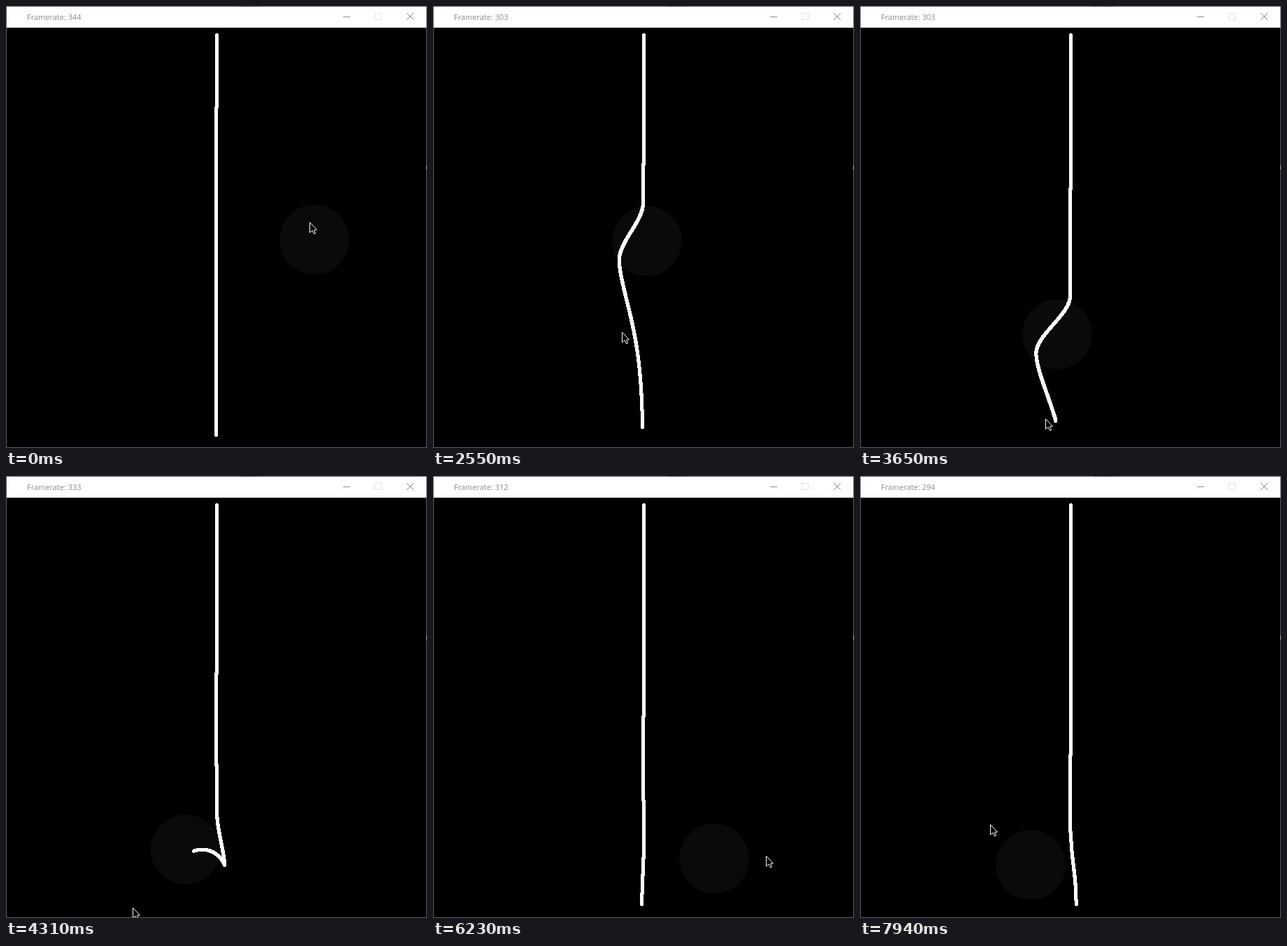
These frames come from a looping animation (602 px wide and 632 px high, 7.99 s). An HTML page with a canvas:

```html
<!DOCTYPE html>
<html lang="en">
<head>
<meta charset="utf-8">
<title>Rope</title>
<style>
html, body { margin: 0; width: 100%; height: 100%; overflow: hidden; background: #000; }
canvas { display: block; width: 100vw; height: 100vh; }
</style>
</head>
<body>
<canvas id="stage" width="602" height="632"></canvas>
<script>
const ctx = document.getElementById('stage').getContext('2d');
const LOOP = 7990;
const FOLLOW = 0.00094;            // share of its distance the ball closes per ms
const RADIUS = 50;
const TOP_X = 301, TOP_Y = 41, ROPE = 571.5, TAIL = 54;
const SLIPS = [3750, 5750, 7650];  // moments when the rope slips past the ball
const WHIP = 4310;                 // moment when the rope's tail is curled up most

const keys = [
  { t: 0, ball: [441, 334], mouse: [434, 309], ms: 2.9 },
  { t: 1450, ball: [373, 265], mouse: [263, 225], ms: 2.9 },
  { t: 2550, ball: [306, 336], mouse: [270, 466], ms: 3.3 },
  { t: 3060, ball: [291, 399], mouse: [265, 528], ms: 3.1 },
  { t: 4310, ball: [257, 534], mouse: [181, 617], ms: 3 },
  { t: 5400, ball: [280, 566], mouse: [450, 555], ms: 3.1 },
  { t: 6230, ball: [402, 547], mouse: [477, 543], ms: 3.2 },
  { t: 7000, ball: [350, 563], mouse: [205, 604], ms: 3.1 },
  { t: 7940, ball: [244, 556], mouse: [186, 498], ms: 3.4 }
];

const lerp = (a, b, u) => a + (b - a) * u;
const clamp = u => Math.max(0, Math.min(1, u));
const ease = u => { u = clamp(u); return u * u * (3 - 2 * u); };

function span(t) {
  let i = 0;
  while (i < keys.length - 2 && t >= keys[i + 1].t) i++;
  const a = keys[i], b = keys[i + 1], time = b.t - a.t;
  return { a, b, time, u: (t - a.t) / time };
}

// The ball's speed is proportional to its distance from the mouse,
// so one cubic curve gives both positions.
function motion(t) {
  const { a, b, time, u } = span(t), ball = [], mouse = [];
  for (const k of [0, 1]) {
    const p = a.ball[k], d = b.ball[k] - p;
    const m = (a.mouse[k] - p) * FOLLOW * time;
    const n = (b.mouse[k] - b.ball[k]) * FOLLOW * time;
    const c2 = 3 * d - 2 * m - n, c3 = m + n - 2 * d;
    ball[k] = p + u * (m + u * (c2 + u * c3));
    mouse[k] = ball[k] + (m + u * (2 * c2 + 3 * u * c3)) / (FOLLOW * time);
  }
  return { ball, mouse };
}

function frameRate(t) {
  const { a, b, u } = span(t);
  const wave = 2 * Math.sin(Math.PI * clamp(u)) ** 2;
  return Math.floor(10000 / Math.round(lerp(a.ms, b.ms, clamp(u)) * 10 + wave));
}

// Sideways push of the ball on a rope lying left (-1) or right (1) of it
function push(side, x) {
  return side * 0.6 * Math.max(0, side * (x - TOP_X) + RADIUS + 12);
}

// Steep above the ball, long and soft below it
function bulge(dy) {
  const below = dy - 27;
  return below < 0 ? ease(1 + below / 83) : Math.exp(-((below / 105) ** 1.6));
}

function ropeShape(t, ball) {
  const done = SLIPS.filter(s => s <= t).length;
  const side = done % 2 ? 1 : -1;
  const since = done ? t - SLIPS[done - 1] : LOOP;
  const turn = ease(since / 300);
  const amp = lerp(push(-side, ball[0]), push(side, ball[0]), turn);
  const sway = side * 13 * turn * Math.exp(-since / 312);
  const upper = 144 + 0.032 * t;
  const lower = done ? 300 + 0.0262 * t : Infinity;
  return y => TOP_X - (y > upper && y < lower ? 1 : 0) +
    amp * bulge(y - ball[1]) + sway * ease((y - 520) / 95);
}

function box(color, x, y, w, h) {
  ctx.fillStyle = color;
  ctx.fillRect(x, y, w, h);
}

function line(color, x1, y1, x2, y2) {
  ctx.strokeStyle = color;
  ctx.beginPath();
  ctx.moveTo(x1, y1);
  ctx.lineTo(x2, y2);
  ctx.stroke();
}

function polygon(points) {
  ctx.beginPath();
  points.forEach(p => ctx.lineTo(...p));
  ctx.closePath();
}

// Hard-edged round brush, five pixels wide
function dab(x, y) {
  x = Math.round(x);
  y = Math.round(y);
  ctx.fillRect(x - 2, y - 1, 5, 3);
  ctx.fillRect(x - 1, y - 2, 3, 5);
}

function drawWindow(t) {
  box('#665a70', 0, 0, 602, 632);
  box('#000', 1, 31, 600, 600);
  box('#fff', 1, 1, 600, 30);
  for (let x = 334; x < 362; x += 5) box('#3a3440', x, 0, 3, 1);
  box('#b8b4bc', 601, 228, 1, 6);

  ctx.fillStyle = '#8c8c8c';
  ctx.font = '11px "Open Sans", "Noto Sans", sans-serif';
  ctx.fillText('Framerate: ' + frameRate(t), 30, 20);

  ctx.lineWidth = 1;
  line('#8e8e8e', 482, 15.5, 492, 15.5);
  ctx.strokeStyle = '#e3e3ea';
  ctx.strokeRect(527.5, 10.5, 9, 9);
  line('#858585', 573, 10, 583, 20);
  line('#858585', 583, 10, 573, 20);
}

function drawBall([x, y]) {
  ctx.fillStyle = '#0a0a0a';
  polygon(Array.from({ length: 30 }, (_, i) => {
    const a = i * Math.PI / 15 - Math.PI / 2;
    return [x + RADIUS * Math.cos(a), y + RADIUS * Math.sin(a)];
  }));
  ctx.fill();
}

function drawRope(t, ball) {
  const xAt = ropeShape(t, ball);
  const bounce = 11 * (t / 200) * Math.exp(1 - t / 200);
  const curl = Math.exp(-(((t - WHIP) / 160) ** 2));
  const tail = TAIL * curl, hanging = ROPE + bounce - tail;

  ctx.fillStyle = '#fff';
  let x = TOP_X, y = TOP_Y;
  for (let len = 0; len < hanging; y += 0.5) {
    const next = xAt(y);
    len += Math.hypot(next - x, 0.5);
    x = next;
    dab(x, y);
  }
  for (let s = 0; s < tail; s += 0.5) {
    const heading = (90 + (160 - 90 * s / tail) * curl) * Math.PI / 180;
    x += 0.5 * Math.cos(heading);
    y += 0.5 * Math.sin(heading);
    dab(x, y);
  }
}

function drawMouse([x, y]) {
  ctx.save();
  ctx.translate(Math.round(x), Math.round(y));
  ctx.miterLimit = 2;
  ctx.fillStyle = '#000';
  ctx.strokeStyle = '#fff';
  polygon([[0.5, 0.5], [0.5, 15], [4, 12], [6.5, 17], [8.5, 16], [6.5, 11.3], [10.5, 11]]);
  ctx.fill();
  ctx.stroke();
  ctx.restore();
}

function frame() {
  const t = performance.now() % LOOP;
  const { ball, mouse } = motion(t);
  drawWindow(t);
  ctx.save();
  ctx.beginPath();
  ctx.rect(1, 31, 600, 600);
  ctx.clip();
  drawBall(ball);
  drawRope(t, ball);
  drawMouse(mouse);
  ctx.restore();
  requestAnimationFrame(frame);
}
frame();
</script>
</body>
</html>
```
